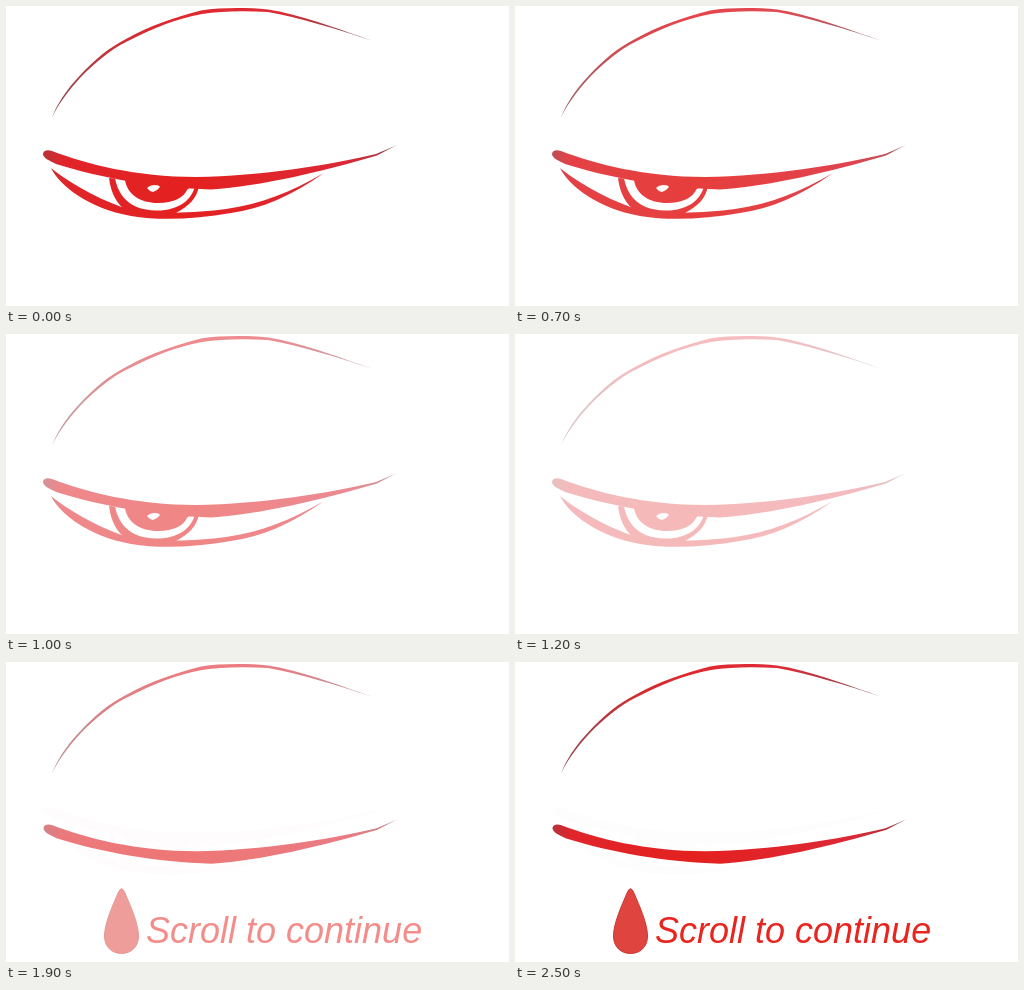
Recreate the animation shown at these times as an HTML page. Size 503 by 300 pixels, loop 4 s.

```html
<!DOCTYPE html>
<html lang="en">
<head>
<meta charset="utf-8">
<title>Scroll to continue</title>
<style>
  html, body { margin: 0; width: 100%; height: 100%; overflow: hidden; background: #fff; }
  svg { display: block; width: 100%; height: 100%; }
  text { font: italic 36px "Liberation Sans", Arial, sans-serif; fill: #e8251f; }
</style>
</head>
<body>
<svg viewBox="0 0 503 300">
  <defs>
    <linearGradient id="ink" gradientUnits="userSpaceOnUse" x1="38" y1="0" x2="392" y2="0">
      <stop offset="0" stop-color="#b8323a"/>
      <stop offset=".05" stop-color="#e0252b"/>
      <stop offset=".4" stop-color="#e4211f"/>
      <stop offset=".85" stop-color="#dc2836"/>
      <stop offset=".95" stop-color="#b0343c"/>
      <stop offset="1" stop-color="#888"/>
    </linearGradient>
    <linearGradient id="browInk" gradientUnits="userSpaceOnUse" x1="46" y1="0" x2="367" y2="0">
      <stop offset="0" stop-color="#8a4a50"/>
      <stop offset=".2" stop-color="#cc2f36"/>
      <stop offset=".4" stop-color="#e0282e"/>
      <stop offset=".7" stop-color="#dc2c36"/>
      <stop offset=".9" stop-color="#a04048"/>
      <stop offset="1" stop-color="#888"/>
    </linearGradient>
    <path id="lid" d="M37 148C37 145 41 143 46 145C80 158 130 171 190 171C255 170 325 159 370 148L391 139L371 149.5C315 166 255 180 205 183.5C150 182 95 172 50 158C44 155 37 152 37 148Z"/>
  </defs>

  <path id="brow" fill="url(#browInk)" d="M46 112C50 100 60 84 73 70.5C88 54 103 41.5 120 33C145 19 170 11 195 4.5C215 1.5 240 1.5 262 3.5C292 8 330 22 367 35C330 23 292 11 262 6C240 4.8 215 4.8 196 8C170 13 147 22 121 35.5C104 44 89 56.5 74 72C62 85 51 100 46 112Z"/>

  <g id="open" fill="url(#ink)">
    <path d="M45 162C60 174 85 190 118 202C150 209 190 207 220 203C255 198 285 186 318 167C285 190 255 203 225 207C190 213 155 215 125 210C82 202 54 180 45 162Z"/>
    <path d="M103 172C105 188 111 198 121 206C140 211 158 211 170 207C183 200 191 192 193 180Z"/>
    <path d="M109 172C112 188 122 204 150 204.5C172 205 186 194 189 180Z" fill="#fff"/>
    <path d="M119 174C121 188 134 197 152 197C168 197 178 191 181 184C183 181 188 180 190 182V176Z"/>
    <use href="#lid"/>
    <path d="M141 182Q144 179 149 179Q153 179 154 181Q151 185 147 186Q143 185 141 182Z" fill="#fff"/>
  </g>

  <use id="closed" href="#lid" fill="url(#ink)" transform="translate(.5 18.3)"/>

  <g id="prompt">
    <path fill="#e0443e" stroke="#c93732" d="M112.5 230Q115.5 223.5 118.5 230C125 245 132.5 262 132.5 274C132.5 285 125 291.5 115.5 291.5C106 291.5 98.5 285 98.5 274C98.5 262 106 245 112.5 230Z"/>
    <text x="140" y="281">Scroll to continue</text>
  </g>
</svg>
<script>
  const LOOP = 4000, STEP = 100;

  // Opacity keys: [time in ms, value]
  const fadeOut = [[0, 1], [600, .96], [800, .77], [1200, .31], [1400, .02]];
  const tracks = {
    open: [...fadeOut, [1600, .015], [2100, .004]],
    brow: [...fadeOut, [1500, .02], [1600, .03], [2100, 1]],
    closed: [[0, 0], [1500, 0], [1600, .035], [2100, 1]],
    prompt: [[0, 0], [1500, 0], [1600, .035], [2100, .84], [2500, 1]]
  };

  function valueAt(keys, t) {
    const i = keys.findIndex(k => k[0] > t);
    if (i < 0) return keys[keys.length - 1][1];
    const [t0, a] = keys[i - 1], [t1, b] = keys[i];
    return a + (b - a) * (t - t0) / (t1 - t0);
  }

  const start = performance.now();

  function draw() {
    const elapsed = (performance.now() - start) % LOOP;
    const t = Math.floor(elapsed / STEP) * STEP;
    for (const id in tracks)
      document.getElementById(id).setAttribute("opacity", valueAt(tracks[id], t));
    requestAnimationFrame(draw);
  }

  draw();
</script>
</body>
</html>
```
